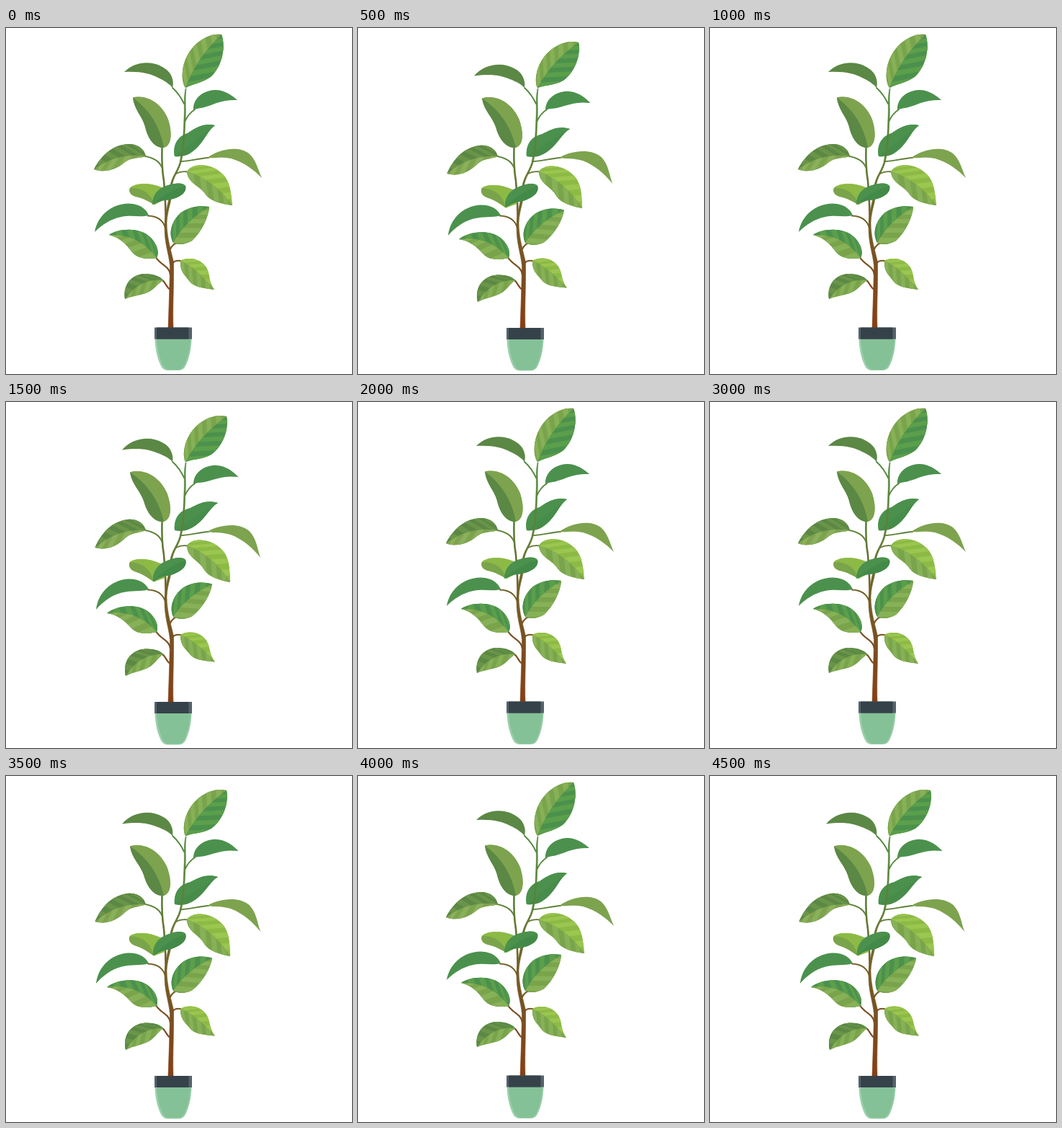
These frames come from a looping animation (480x480 px, 5000 ms). An HTML page:

```html
<!DOCTYPE html>
<html lang="en">
<head>
<meta charset="utf-8">
<title>Potted plant</title>
<style>
html, body { margin: 0; width: 100%; height: 100%; overflow: hidden; background: #fff; }
svg { display: block; width: 100%; height: 100%; }
</style>
</head>
<body>
<svg viewBox="0 0 480 480">
  <defs>
    <linearGradient id="bark" gradientUnits="userSpaceOnUse" x1="0" y1="84" x2="0" y2="415">
      <stop offset="0" stop-color="#4f8a3c"/>
      <stop offset=".3" stop-color="#5d8038"/>
      <stop offset=".52" stop-color="#716126"/>
      <stop offset=".75" stop-color="#7a4f20"/>
      <stop offset="1" stop-color="#843f14"/>
    </linearGradient>
  </defs>
  <g id="back"></g>
  <g id="wood" fill="none" stroke="url(#bark)" stroke-linecap="round"></g>
  <g id="front"></g>
  <g id="pot">
    <path d="M206.500 431H257.500C257 446 254 459 249 469Q246 475 239 475H225Q218 475 215 469C210 459 207 446 206.500 431Z" fill="#9bcfaa"/>
    <path d="M209 431H256C255 447 252 459 247 469Q244 474 238 474H227Q221 474 218 469C213 459 210 447 209 431Z" fill="#85c197"/>
    <path d="M206 415.500H258V431.500H206Z" fill="#55636a"/>
    <path d="M209 415.500H253.500V431.500H209Z" fill="#36424a"/>
  </g>
</svg>
<script>
const NS = 'http://www.w3.org/2000/svg';
const $ = id => document.getElementById(id);

function add(parent, tag, attrs) {
  const el = document.createElementNS(NS, tag);
  for (const k in attrs) el.setAttribute(k, attrs[k]);
  return parent.appendChild(el);
}

const OLIVE = ['#5b8844', '#6a9549'], MOSS = ['#7da34e', '#8bb05b'],
      GREEN = ['#4b914d', '#5b9f4b'], LIME = ['#8cba45', '#9bc64f'],
      LEAF = ['#79a44b', '#87b157'];

// base, tip, tip in the second pose (to), rib control point,
// both edges (base to tip, tip to base), colours of both halves, stripe count
const leaves = [
  { base: [234, 178], tip: [290, 135], to: [294, 140], rib: [256, 160], back: true,
    up: 'C231 161 239 150 252 146C266 136 277 132 290 135',
    low: 'C280 142 276 155 265 166C255 176 246 179 234 178', a: GREEN, b: ['#478c4a'] },
  { base: [249, 83], tip: [299, 9], to: [306, 20], rib: [264, 42], n: 5,
    up: 'C242 73 242 45 261 25C274 12 287 8 299 9',
    low: 'C305 25 301 51 285 67C273 76 260 77 249 83', a: LEAF, b: GREEN },
  { base: [231, 83], tip: [164, 61], to: [161, 66.5], rib: [212, 61],
    up: 'C234 73 229 61 220 56C205 45 180 45 164 61',
    low: 'C188 60 199 63 211 69C222 74 228 79 231 83', a: OLIVE },
  { base: [260, 114], tip: [321, 100], to: [322.5, 104], rib: [285, 101],
    up: 'C259 100 270 88 288 86C302 85 313 93 321 100',
    low: 'C300 99 291 105 278 109C270 112 264 111 260 114', a: GREEN },
  { base: [219, 166], tip: [176, 96.5], to: [172, 97.5], rib: [211, 122],
    up: 'C230 163 231 146 225 127C216 104 195 92 176 96.500',
    low: 'C178 114 189 122 193 137C197 155 207 167 219 166', a: MOSS, b: OLIVE },
  { base: [194, 178], tip: [122, 196], to: [123.5, 202], rib: [155, 172], n: 4,
    up: 'C192 169 185 161 170 161C145 162 130 181 122 196',
    low: 'C135 201 151 198 165 186C174 179 185 181 194 178', a: OLIVE, b: MOSS },
  { base: [279, 180], tip: [355, 208], to: [353, 216], rib: [328, 173],
    up: 'C294 169 321 162 337 174C347 183 349 195 355 208',
    low: 'C344 197 330 186 312 181C299 178 290 181 279 180', a: MOSS },
  { base: [251, 199], tip: [314, 246], to: [311, 250], rib: [288, 210], n: 4,
    up: 'C258 188 280 187 296 199C312 210 312 230 314 246',
    low: 'C300 244 284 241 277 231C270 219 252 216 251 199', a: LIME, b: LEAF },
  { base: [172, 222], tip: [206, 245], to: [205, 249.5], rib: [198, 221],
    up: 'C180 214 204 215 217 222L220 238L206 245',
    low: 'C195 239 190 236 180 234C172 232 170 226 172 222', a: LIME, b: LEAF },
  { base: [249, 219], tip: [203, 245], to: [204, 249], rib: [224, 226],
    up: 'C245 214 235 215 225 218C210 222 203 233 203 245',
    low: 'C207 244 212 240 220 239C236 238 252 230 249 219', a: GREEN, b: ['#438a49'] },
  { base: [198, 260], tip: [123, 283], to: [125, 288], rib: [160, 255],
    up: 'C195 252 187 244 170 243.500C145 244 127 261 123 283',
    low: 'C133 273 145 265 160 262C175 259 185 263 198 260', a: GREEN },
  { base: [232, 298], tip: [282, 248], to: [286, 252.5], rib: [247, 269], n: 4,
    up: 'C225 285 229 268 243 256C256 247 270 246 282 248',
    low: 'C281 262 272 282 258 295C248 301 239 301 232 298', a: GREEN, b: LEAF },
  { base: [209, 319], tip: [143, 287], to: [140, 293], rib: [184, 285], n: 4,
    up: 'C213 311 210 300 200 290C185 276 156 278 143 287',
    low: 'C157 290 167 300 175 311C183 320 195 321 209 319', a: GREEN, b: LEAF },
  { base: [242, 323], tip: [289, 363], to: [290, 360.5], rib: [262, 331], n: 4,
    up: 'C250 318 268 318 277 331C284 341 280 350 289 363',
    low: 'C275 361 262 360 255 352C248 342 241 338 242 323', a: LIME, b: LEAF },
  { base: [218, 350], tip: [165, 376], to: [166, 380], rib: [187, 346], n: 4,
    up: 'C215 345 205 341 192 341C175 342 162 355 165 376',
    low: 'C176 371 188 371 198 366C206 362 211 354 218 350', a: OLIVE, b: LEAF }
];

function ribPoint(leaf, u) {
  const v = 1 - u;
  return [0, 1].map(i => v * v * leaf.base[i] + 2 * u * v * leaf.rib[i] + u * u * leaf.tip[i]);
}

// turn and scale about the base that takes the tip to its second place
function bend({ base: [x, y], tip, to }) {
  const ax = tip[0] - x, ay = tip[1] - y, bx = to[0] - x, by = to[1] - y;
  const sq = ax * ax + ay * ay;
  const c = (ax * bx + ay * by) / sq, s = (ax * by - ay * bx) / sq;
  return `matrix(${c} ${s} ${-s} ${c} ${x - c * x + s * y} ${y - s * x - c * y})`;
}

let clips = 0;
function half(group, leaf, d, colors, side) {
  add(group, 'path', { d, fill: colors[0] });
  if (!leaf.n) return;
  const id = 'clip' + clips++;
  add(add(group, 'clipPath', { id }), 'path', { d });
  const dx = leaf.tip[0] - leaf.base[0], dy = leaf.tip[1] - leaf.base[1];
  const k = 40 / Math.hypot(dx, dy);
  const ox = (dx - dy * side) * k, oy = (dy + dx * side) * k;
  let bands = '';
  for (let i = -3; i < leaf.n; i++) {
    const [x, y] = ribPoint(leaf, i / leaf.n);
    const [p, q] = ribPoint(leaf, (i + 0.5) / leaf.n);
    bands += `M${x} ${y}L${p} ${q}L${p + ox} ${q + oy}L${x + ox} ${y + oy}Z`;
  }
  add(group, 'path', { d: bands, fill: colors[1], 'clip-path': `url(#${id})` });
}

for (const leaf of leaves) {
  const { base, tip, rib, up, low, a, b } = leaf;
  const g = leaf.el = add($(leaf.back ? 'back' : 'front'), 'g', {});
  // the whole shape also hides the seam along the rib
  add(g, 'path', { d: `M${base}${up}${low}Z`, fill: a[0] });
  if (!b) continue;
  const side = tip[0] > base[0] ? -1 : 1;
  half(g, leaf, `M${base}${up}Q${rib} ${base}Z`, a, side);
  half(g, leaf, `M${tip}${low}Q${rib} ${tip}Z`, b, -side);
}

// tapered trunk, then twigs
add($('wood'), 'path', {
  d: 'M225 416C226 390 227 358 227.500 330C226 313 220 300 220 277C220 255 227 240 227.500 222C229 205 240 197 242 181C246 160 246 145 247 125C248 108 246 100 249 84' +
     'L250 84C248 100 250 110 249 125C248 145 248 163 244 182C241 199 231 206 230 222C231 240 224 250 223 270C223 292 230 312 232.500 325C233 355 231 390 232 416Z',
  fill: 'url(#bark)', 'stroke-width': 0.6
});
const twigs = [
  [2.6, 'M221.500 275C222 252 221 235 219 212C216 195 216 182 216.500 165'],
  [1.9, 'M231 83Q241 92 247 105'],
  [1.9, 'M262 113Q253 119 248.500 129'],
  [1.9, 'M193 178Q211 181 216 193'],
  [1.9, 'M281 180C265 181 256 185 242 185'],
  [1.8, 'M252 199.500Q243 198 236 202'],
  [2, 'M197 260.500Q216 261 221 277'],
  [2, 'M238 297Q228 302 226 312'],
  [2.2, 'M208 318C214 329 226 329 228 342'],
  [2.2, 'M244 323.500Q235 321 230 327'],
  [2.2, 'M217 350C222 353 222 360 228 363']
];
for (const [w, d] of twigs) add($('wood'), 'path', { d, 'stroke-width': w });

const HOLD = 500;
let shown = -1;
function draw(ms) {
  const pose = Math.floor(ms / HOLD) % 2;
  if (pose === shown) return;
  shown = pose;
  for (const leaf of leaves)
    leaf.el.setAttribute('transform', pose ? bend(leaf) : 'translate(0 0)');
  $('pot').setAttribute('transform', `translate(0 ${pose * 0.4})`);
}

const start = performance.now();
function tick() {
  draw(performance.now() - start);
  requestAnimationFrame(tick);
}
tick();
</script>
</body>
</html>
```
